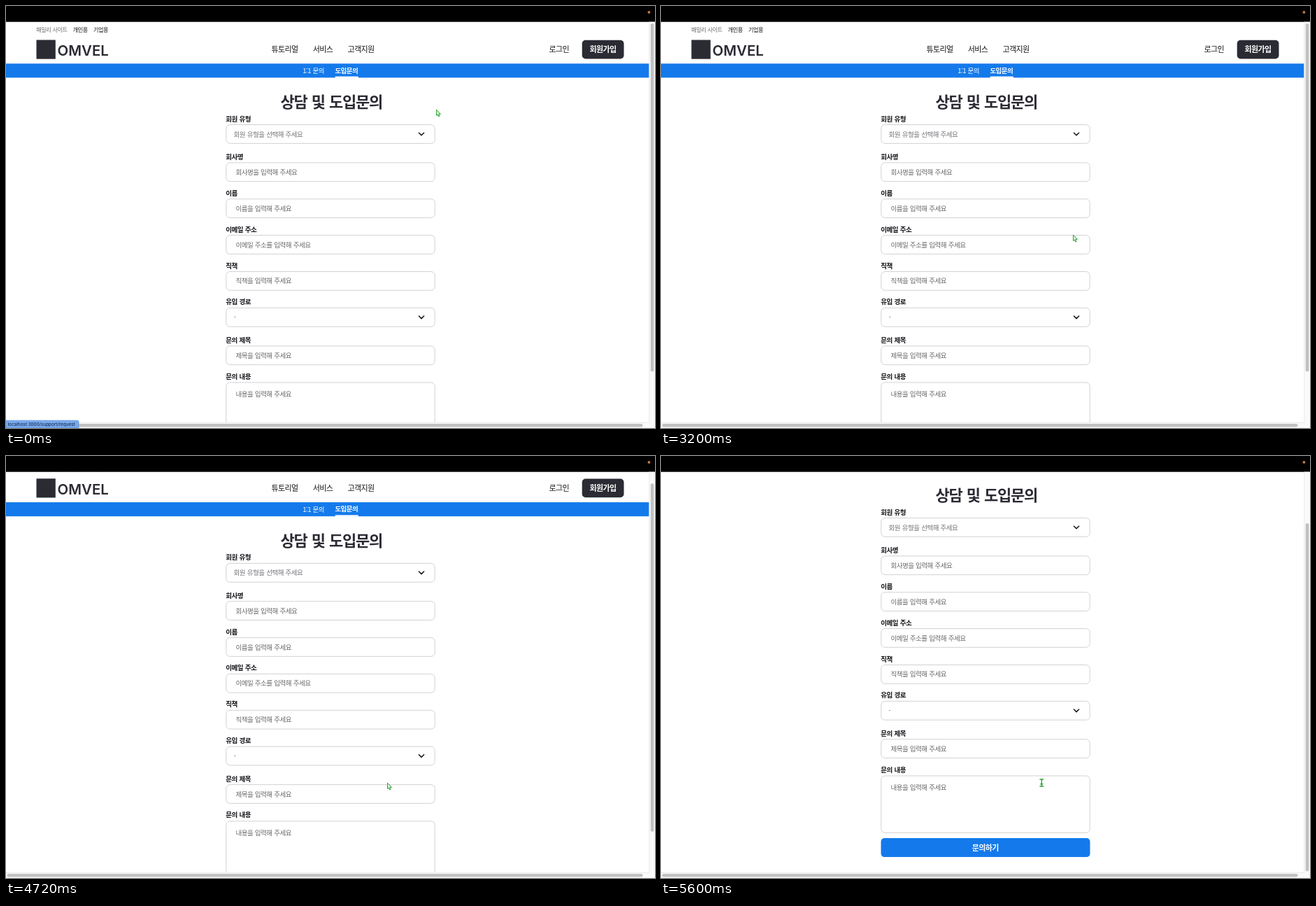
Write an HTML page that moves like this. It is 928 px wide and 603 px high and loops after 5.64 s.

```html
<!DOCTYPE html>
<html lang="ko">
<head>
<meta charset="utf-8">
<title>상담 및 도입문의</title>
<style>
  html, body { margin: 0; width: 100%; height: 100%; overflow: hidden; background: #fff; }
  svg { display: block; width: 928px; height: 603px; }
  text {
    font-family: "Noto Sans CJK KR", "Noto Sans CJK", "Noto Sans KR", sans-serif;
    letter-spacing: -.055em; word-spacing: .055em; white-space: pre;
  }
  .latin { font-family: Inter, sans-serif; letter-spacing: 0; }
</style>
</head>
<body>
<svg id="stage" viewBox="0 0 928 603" xmlns="http://www.w3.org/2000/svg">
  <defs><clipPath id="view"><rect y="22.6" width="920" height="572.4"/></clipPath></defs>
  <rect width="928" height="603" fill="#fff"/>
  <g clip-path="url(#view)"><g id="page"></g></g>
  <rect width="928" height="22.7" fill="#000"/>
  <circle cx="919.4" cy="8.9" r="1.9" fill="#c87a35"/>
  <rect x="919.5" y="22.7" width="8.5" height="580.3" fill="#fafafa"/>
  <rect y="594.8" width="928" height="8.2" fill="#fafafa"/>
  <path d="M919.9 22.7V595M0 595.2H920" fill="none" stroke="#e6e6e6" stroke-width=".8"/>
  <rect id="thumb" x="921.8" y="25" width="4.6" height="497.5" rx="2.3" fill="#c1c1c1"/>
  <rect x="1.5" y="597" width="909" height="4.6" rx="2.3" fill="#c1c1c1"/>
  <g id="status">
    <path d="M0 592.2H102Q104 592.2 104 594.2V603H0Z" fill="#78a9ee" stroke="#5d8fd8" stroke-width=".7"/>
    <text class="latin" x="2.5" y="600" font-size="6.4" fill="#0c1c3c">localhost:3000/support/request</text>
  </g>
  <g id="cursor" stroke="#2fa337" stroke-width="1" stroke-linejoin="round" stroke-linecap="round" fill="#d9f0d9">
    <path id="arrow" d="M.5 .5V8.6L2.2 7.1L3.6 10L5 9.4L3.7 6.6L6 6.4Z"/>
    <path id="hand" d="M-1.4 .6Q-.6 -.6 .3 .6L.8 3.4L2 2.8L3 3.4L4 3.1L5 4.2L4.9 6.6L3.8 9.3H-.4L-3 5.8Q-3.2 4.4 -1.6 4.8L-.7 5.4ZM1.1 5.3V7.4M2.9 5.3V7.4"/>
    <path id="beam" d="M-2.4 -5H2.4M-2.4 5H2.4M0 -5V5M-1.5 1.8H1.5" fill="none" stroke-width="1.4"/>
  </g>
</svg>
<script>
const LOOP = 5640, STEP = 40;
const INK = '#2b2b34', BLUE = '#147aeb', GREY = '#68686c';
const $ = id => document.getElementById(id);

function add(parent, tag, attrs, content) {
  const el = document.createElementNS('http://www.w3.org/2000/svg', tag);
  for (const k in attrs) el.setAttribute(k, attrs[k]);
  if (content) el.textContent = content;
  parent.appendChild(el);
  return el;
}

const page = $('page');

// Text placed by its left edge and vertical centre.
const label = (x, cy, size, content, fill = '#15151a', weight = 400, parent = page) =>
  add(parent, 'text', { x, y: cy + size * .37, 'font-size': size, 'font-weight': weight, fill }, content);

const box = (y, height, parent = page) =>
  add(parent, 'rect', { x: 314.8, y, width: 298.4, height, rx: 5.5, fill: '#fff', stroke: '#cdcdd1', 'stroke-width': .9 });

const chevron = cy =>
  add(page, 'path', { d: `M590.4 ${cy - 1.8}L594 ${cy + 1.8}L597.6 ${cy - 1.8}`, fill: 'none',
    stroke: '#15151a', 'stroke-width': 1.5, 'stroke-linecap': 'round', 'stroke-linejoin': 'round' });

// Header
label(43.2, 33.8, 8.1, '패밀리 사이트', '#6a6a6e');
label(95.8, 33.8, 8.1, '개인용', '#15151a', 500);
label(124.9, 33.8, 8.1, '기업용', '#15151a', 500);
add(page, 'rect', { x: 43.5, y: 48.5, width: 27.3, height: 27.2, fill: INK });
add(page, 'text', { class: 'latin', x: 73.6, y: 70.9, 'font-size': 20.4, 'font-weight': 600, fill: INK }, 'OMVEL');
label(379.5, 62, 11, '튜토리얼', '#15151a', 500);
label(438.8, 62, 11, '서비스', '#15151a', 500);
label(488.5, 62, 11, '고객지원', '#15151a', 500);
label(776.6, 62, 11, '로그인', '#15151a', 500);
add(page, 'rect', { x: 823.7, y: 48.7, width: 59.8, height: 26.8, rx: 5, fill: INK });
label(834.4, 62, 11, '회원가입', '#fff', 700);

// Sub navigation
add(page, 'rect', { y: 82.3, width: 920, height: 20.1, fill: BLUE });
label(424.3, 92.5, 9.5, '1:1 문의', '#fff');
label(470.4, 92, 9.5, '도입문의', '#fff', 700);
add(page, 'rect', { x: 470.7, y: 100.6, width: 33, height: 2.2, fill: '#fff' });

// Form
label(392.6, 137, 22, '상담 및 도입문의', INK, 700);
[
  [183, '회원 유형', '회원 유형을 선택해 주세요', true],
  [237.3, '회사명', '회사명을 입력해 주세요'],
  [289.2, '이름', '이름을 입력해 주세요'],
  [341, '이메일 주소', '이메일 주소를 입력해 주세요'],
  [392.9, '직책', '직책을 입력해 주세요'],
  [444.8, '유입 경로', '-', true],
  [499.2, '문의 제목', '제목을 입력해 주세요'],
].forEach(([cy, name, hint, select]) => {
  label(314.3, cy - 21.9, 9.55, name, '#15151a', 700);
  box(cy - 13.4, 26.8);
  label(select ? 325.5 : 328.4, cy, 9.55, hint, select ? '#74747a' : GREY);
  if (select) chevron(cy);
});
label(314.3, 529, 9.55, '문의 내용', '#15151a', 700);
box(538, 81.3);
label(328.4, 554.2, 9.55, '내용을 입력해 주세요', GREY);
add(page, 'rect', { x: 314.5, y: 627.1, width: 299, height: 27, rx: 5, fill: BLUE });
label(444.8, 640.6, 11, '문의하기', '#fff', 700);

const menu = add(page, 'g', {});
box(199.4, 54.8, menu);
label(325.5, 213, 9.4, '개인', '#808086', 400, menu);
label(325.5, 240.2, 9.4, '기업', '#808086', 400, menu);

// Keyframes: time, values...
const SCROLL = [[4480, 0], [4560, 1.6], [4640, 6], [4720, 16.2], [4800, 43], [4860, 67], [4920, 79.5], [5000, 81]];
const POINTER = [
  [0, 615, 148], [120, 610, 152], [280, 585, 170], [440, 574.5, 178.5], [2120, 574.5, 178.5],
  [2400, 590, 270], [2680, 603, 376], [2880, 602, 366], [3200, 589, 327], [3280, 573, 350],
  [3560, 553, 428], [3880, 545, 467], [5340, 545, 467], [5360, 544.3, 467]
];
const FADE = [[160, 1], [320, 0]];

function sample(keys, t) {
  const i = keys.findIndex(k => k[0] > t);
  if (i === 0) return keys[0].slice(1);
  if (i < 0) return keys[keys.length - 1].slice(1);
  const a = keys[i - 1], b = keys[i], p = (t - a[0]) / (b[0] - a[0]);
  return a.slice(1).map((v, n) => v + (b[n + 1] - v) * p);
}

const show = (el, on) => { el.style.display = on ? '' : 'none'; };

function draw(t) {
  const [scroll] = sample(SCROLL, t);
  page.setAttribute('transform', `translate(0 ${-scroll})`);
  $('thumb').setAttribute('y', 25 + scroll * .875);

  const [opacity] = sample(FADE, t);
  $('status').setAttribute('opacity', opacity);
  show(menu, t >= 520 && t < 1680);

  const [x, y] = sample(POINTER, t);
  $('cursor').setAttribute('transform', `translate(${x} ${y})`);
  const beam = t >= 5360, hand = t < 2400 && y > 169 && y < 197;
  show($('beam'), beam);
  show($('hand'), hand);
  show($('arrow'), !beam && !hand);
}

const start = performance.now();
function tick() {
  const t = Math.max(0, performance.now() - start) % LOOP;
  draw(Math.floor(t / STEP) * STEP);
  requestAnimationFrame(tick);
}
draw(0);
requestAnimationFrame(tick);
</script>
</body>
</html>
```
